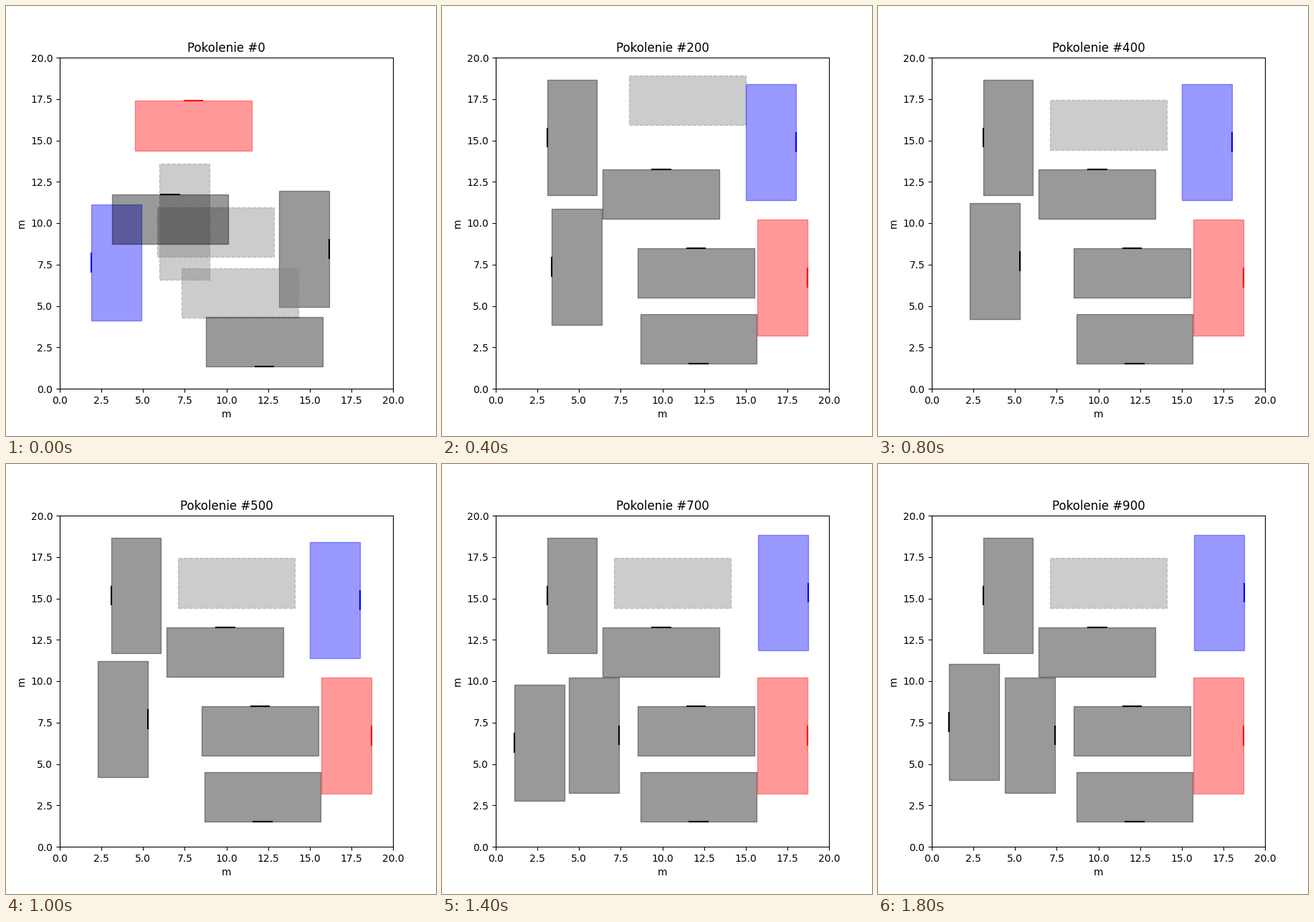
A matplotlib script for the animation above (2 s loop, 600 by 600 pixels).

```python
import matplotlib.pyplot as plt
from matplotlib.animation import FuncAnimation
from matplotlib.patches import Rectangle

LENGTH, WIDTH, DOOR = 7, 3, 1.2

# Per step, the boxes that move: name -> (x, y, door side, colour).
# A box without a door side is dashed; its orientation is given by "h" or "v".
STEPS = {
    0: {
        "east": (13.16, 4.94, "right", "black"),
        "spare": (5.98, 6.58, "v", "gray"),
        "south": (5.86, 7.96, "h", "gray"),
        "west": (7.32, 4.28, "h", "gray"),
        "blue": (1.90, 4.11, "left", "blue"),
        "red": (4.52, 14.39, "top", "red"),
        "middle": (3.12, 8.74, "top", "black"),
        "low": (8.78, 1.33, "bottom", "black"),
    },
    1: {
        "east": (3.08, 11.67, "left", "black"),
        "spare": (8.01, 15.92, "h", "gray"),
        "south": (6.48, 2.50, "h", "gray"),
        "west": (3.36, 3.85, "left", "black"),
        "blue": (15.02, 11.39, "right", "blue"),
        "red": (15.71, 3.20, "right", "red"),
        "middle": (6.22, 12.59, "bottom", "black"),
        "low": (8.52, 5.49, "top", "black"),
    },
    2: {
        "middle": (6.42, 10.25, "top", "black"),
        "south": (8.67, 1.51, "bottom", "black"),
    },
    3: {
        "west": (1.56, 3.38, "right", "black"),
        "spare": (7.11, 14.43, "h", "gray"),
    },
    4: {"west": (2.29, 4.20, "right", "black")},
    6: {
        "west": (1.30, 1.95, "left", "black"),
        "blue": (15.75, 11.845, "right", "blue"),
        "extra": (4.40, 3.23, "right", "black"),
    },
    7: {"west": (1.13, 2.77, "left", "black")},
    9: {"west": (1.04, 4.03, "left", "black")},
}


def layout(step):
    boxes = {}
    for k in range(step + 1):
        boxes.update(STEPS.get(k, {}))
    return boxes.values()


def draw_box(x, y, side, color):
    tall = side in ("left", "right", "v")
    w, h = (WIDTH, LENGTH) if tall else (LENGTH, WIDTH)
    dashed = side in ("h", "v")
    ax.add_patch(Rectangle((x, y), w, h, color=color, alpha=0.4, lw=1,
                           ls="--" if dashed else "-"))
    if dashed:
        return
    if tall:
        edge = x + w * (side == "right")
        mid = y + h / 2
        xs, ys = [edge, edge], [mid - DOOR / 2, mid + DOOR / 2]
    else:
        edge = y + h * (side == "top")
        mid = x + w / 2
        xs, ys = [mid - DOOR / 2, mid + DOOR / 2], [edge, edge]
    ax.plot(xs, ys, color=color, lw=1.5, solid_capstyle="butt")


def draw(step):
    ax.clear()
    ax.set(xlim=(0, 20), ylim=(0, 20), xlabel="m", ylabel="m",
           title=f"Pokolenie #{step * 100}")
    for box in layout(step):
        draw_box(*box)
    return []


fig, ax = plt.subplots(figsize=(6, 6), dpi=100)
anim = FuncAnimation(fig, draw, frames=10, interval=200,
                     init_func=lambda: [], repeat=True, repeat_delay=0)
plt.show()
```
